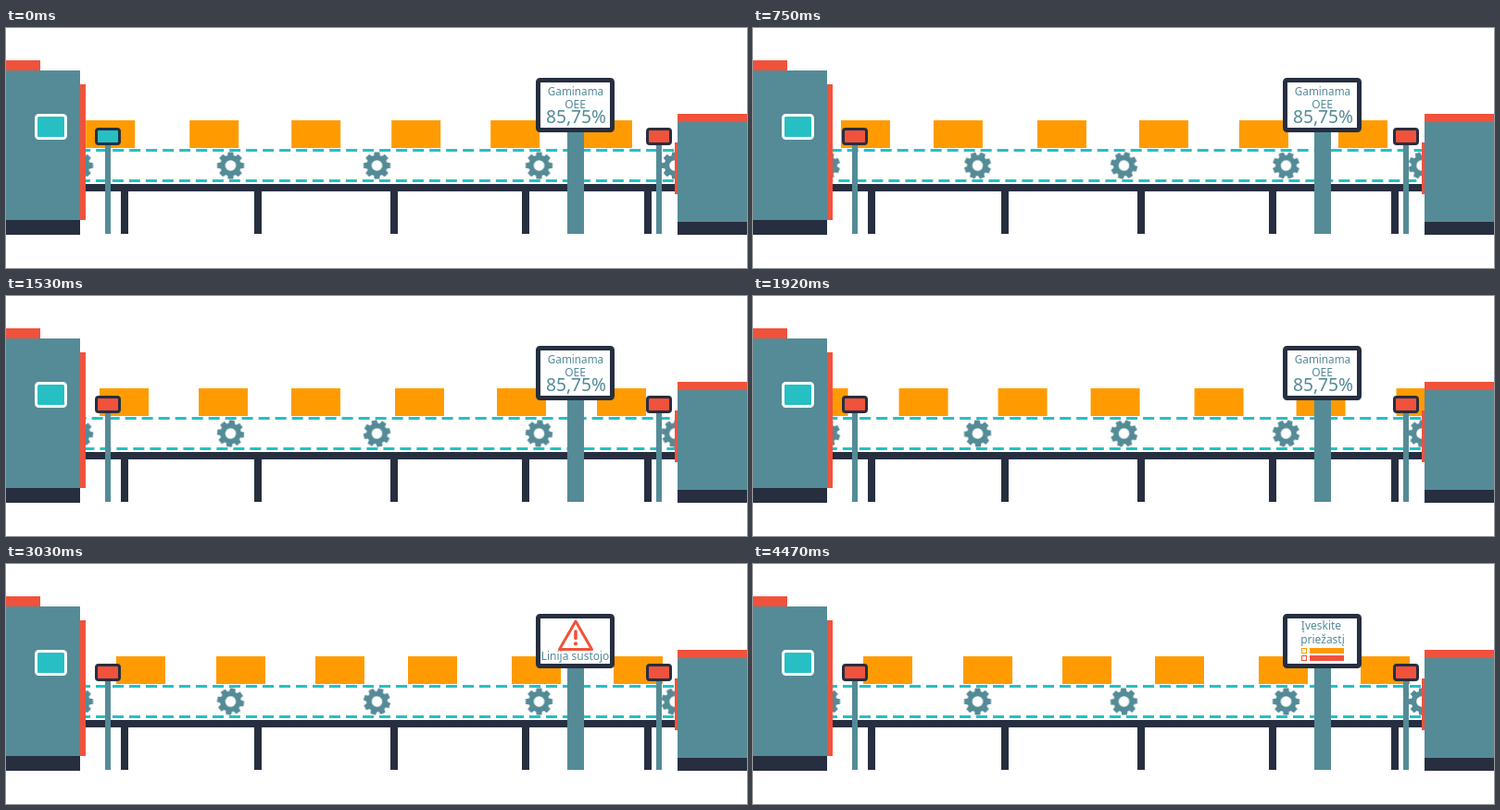
Animation of 800 by 260 pixels, one loop 4500 ms. Source, as an HTML page:

```html
<!DOCTYPE html>
<html lang="lt">
<head>
<meta charset="utf-8">
<title>Gamybos linija</title>
<style>
  html, body { margin: 0; width: 100%; height: 100%; overflow: hidden; background: #fff; }
  svg { display: block; width: 800px; height: 260px; }
  .steel { fill: #548b97; }
  .dark { fill: #262e40; }
  .red { fill: #f1523b; }
  .teal { fill: #26bfc4; }
  .orange { fill: #ff9b00; }
  text { font: 12px "Noto Sans", "Open Sans", sans-serif; fill: #548b97; text-anchor: middle; }
  .lamp { fill: #f1523b; stroke: #262e40; stroke-width: 3; }
  .belt { stroke: #26bfc4; stroke-width: 3; stroke-dasharray: 12 6; stroke-dashoffset: 7; }

  .run, .belt, .gear, .lamp, .screen { animation: 4.5s linear infinite; }
  .run { animation-name: run; }
  .top { animation-name: belt-right; }
  .bottom { animation-name: belt-left; }
  .spin-a { animation-name: spin-a; }
  .spin-b { animation-name: spin-b; }
  .spin-c { animation-name: spin-c; }
  .spin-d { animation-name: spin-d; }
  .lamp, .screen { animation-timing-function: step-end; }
  .in { animation-name: lamp-in; }
  .out { animation-name: lamp-out; }
  .rate { animation-name: rate; }
  .stop { animation-name: stop; }
  .ask { animation-name: ask; }

  /* The line halts after 2.4 s; the rollers run down one by one. */
  @keyframes run { 53.333%, 100% { transform: translateX(348px); } }
  @keyframes belt-right { 53.333%, 100% { stroke-dashoffset: -353; } }
  @keyframes belt-left { 53.333%, 100% { stroke-dashoffset: 367; } }
  @keyframes spin-a { 53.333%, 100% { transform: rotate(360deg); } }
  @keyframes spin-b { 86.667%, 100% { transform: rotate(360deg); } }
  @keyframes spin-c { 100% { transform: rotate(360deg); } }
  @keyframes spin-d { 84%, 100% { transform: rotate(360deg); } }

  @keyframes lamp-in {
    0%, 13.1%, 29.5%, 46% { fill: #26bfc4; }
    1%, 16.3%, 32.7%, 49.3%, 100% { fill: #f1523b; }
  }
  @keyframes lamp-out {
    6.7%, 22%, 38.4% { fill: #26bfc4; }
    0%, 9.9%, 25.2%, 41.6%, 100% { fill: #f1523b; }
  }
  @keyframes rate { 0% { visibility: visible; } 56%, 100% { visibility: hidden; } }
  @keyframes stop { 0%, 81.333%, 100% { visibility: hidden; } 56% { visibility: visible; } }
  @keyframes ask { 0% { visibility: hidden; } 81.333%, 100% { visibility: visible; } }
</style>
</head>
<body>
<svg viewBox="0 0 800 260">
  <defs>
    <g id="gear" class="steel">
      <circle r="8.5" fill="none" stroke="#548b97" stroke-width="5.4"/>
      <g id="teeth">
        <path id="pair" d="M-3.5-10L-2.8-14.5H2.8L3.5-10zM-3.5 10L-2.8 14.5H2.8L3.5 10z"/>
        <use href="#pair" transform="rotate(90)"/>
      </g>
      <use href="#teeth" transform="rotate(45)"/>
    </g>
    <rect id="box" class="orange" y="100" width="53" height="30"/>
    <rect id="leg" class="dark" y="177" width="8" height="46"/>
  </defs>

  <g class="run">
    <use href="#box" x="-229"/>
    <use href="#box" x="-121"/>
    <use href="#box" x="-14"/>
    <use href="#box" x="86"/>
    <use href="#box" x="198"/>
    <use href="#box" x="308"/>
    <use href="#box" x="416"/>
    <use href="#box" x="523"/>
    <use href="#box" x="623"/>
  </g>

  <path class="belt top" d="M86 132.5H722"/>
  <path class="belt bottom" d="M86 165.5H722"/>
  <g transform="translate(79.5 149)"><use href="#gear" class="gear spin-a"/></g>
  <g transform="translate(242.5 149)"><use href="#gear" class="gear spin-b"/></g>
  <g transform="translate(400.5 149)"><use href="#gear" class="gear spin-c"/></g>
  <g transform="translate(575.5 149)"><use href="#gear" class="gear spin-a"/></g>
  <g transform="translate(722 149)"><use href="#gear" class="gear spin-d"/></g>

  <rect class="dark" x="86" y="169" width="636" height="8"/>
  <use href="#leg" x="124"/>
  <use href="#leg" x="268"/>
  <use href="#leg" x="415"/>
  <use href="#leg" x="557"/>
  <use href="#leg" x="689"/>

  <!-- machines -->
  <path class="red" d="M0 35H37V46H0zM80 61H86V208H80z"/>
  <rect class="steel" y="46" width="80" height="162"/>
  <rect class="dark" y="208" width="80" height="16"/>
  <rect class="teal" x="32.5" y="94.5" width="32" height="25" rx="3" stroke="#fff" stroke-width="3"/>
  <path class="red" d="M725 93H800V102H725zM722 124H725V180H722z"/>
  <rect class="steel" x="725" y="102" width="75" height="108"/>
  <rect class="dark" x="725" y="210" width="75" height="14"/>

  <!-- sensors -->
  <path class="steel" d="M107 126H113V223H107zM702 126H708V223H702z"/>
  <rect class="lamp in" x="97.5" y="109.5" width="25" height="16" rx="2.5"/>
  <rect class="lamp out" x="692.5" y="109.5" width="25" height="16" rx="2.5"/>

  <!-- monitor -->
  <rect class="steel" x="606" y="112" width="18" height="111"/>
  <rect x="574.5" y="56.5" width="80" height="54" rx="2" fill="#fff" stroke="#262e40" stroke-width="5"/>
  <g class="screen rate">
    <text x="615" y="73" style="font-size:11.7px">Gaminama</text>
    <text x="614.5" y="86.5">OEE</text>
    <text x="615.5" y="102.5" style="font-size:19.2px">85,75%</text>
  </g>
  <g class="screen stop">
    <path d="M615 62L632.5 92.5H597.5z" fill="none" stroke="#f1523b" stroke-width="3" stroke-linejoin="round"/>
    <path d="M615 73V80.5" stroke="#f1523b" stroke-width="3.6" stroke-linecap="round"/>
    <circle class="red" cx="615" cy="86.3" r="2.1"/>
    <text x="614.5" y="104">Linija sustojo</text>
  </g>
  <g class="screen ask">
    <text x="613.5" y="71">Įveskite</text>
    <text x="615" y="86">priežastį</text>
    <rect x="592.5" y="91.5" width="5" height="5" fill="none" stroke="#ff9b00"/>
    <rect class="orange" x="601" y="91" width="37" height="6"/>
    <rect x="592.5" y="99.5" width="5" height="5" fill="none" stroke="#f1523b"/>
    <rect class="red" x="601" y="99" width="37" height="6"/>
  </g>
</svg>
</body>
</html>
```
